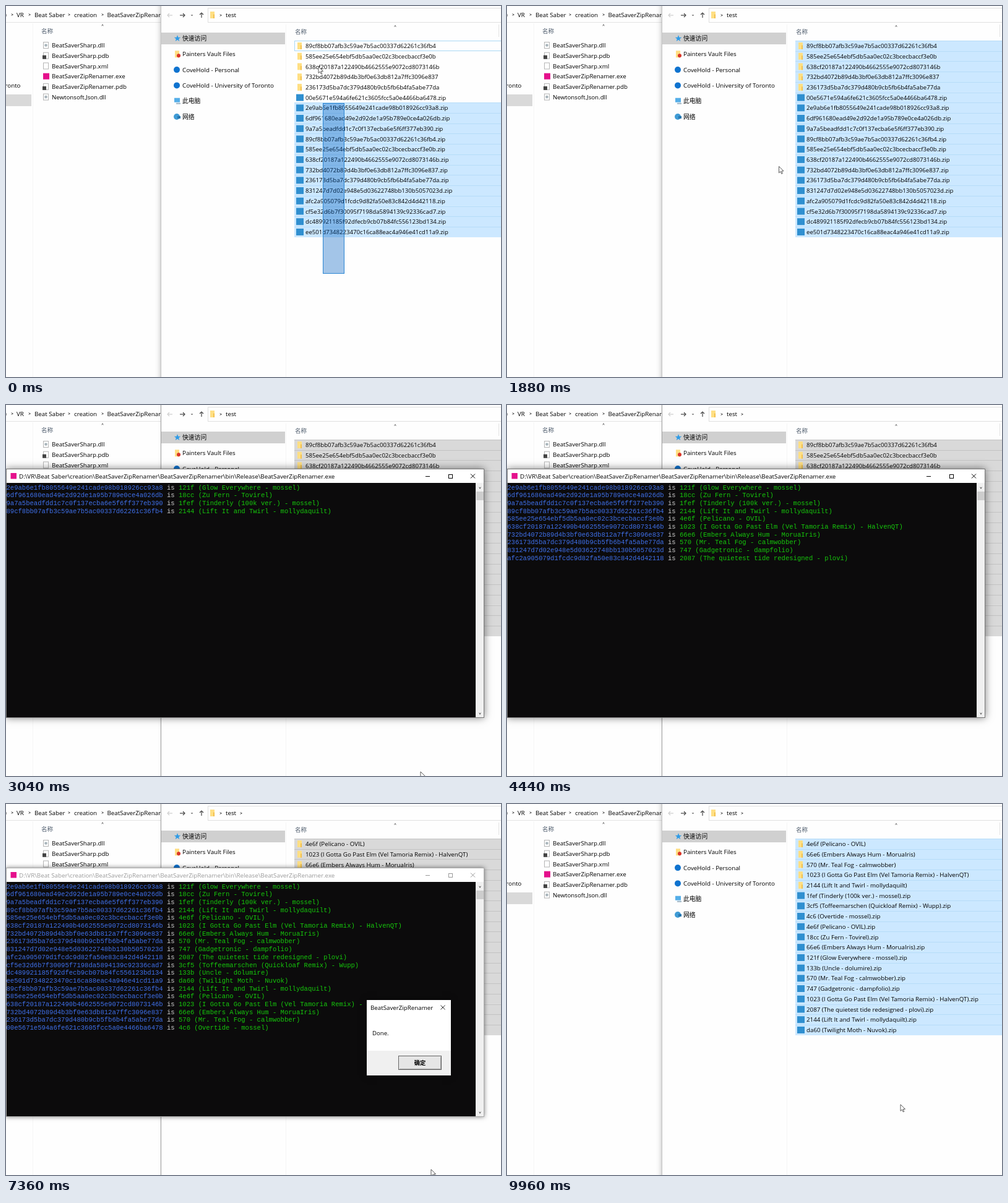
An HTML page with a canvas that plays this animation: 800x600 px, repeating every 10 s.

```html
<!DOCTYPE html>
<html lang="zh">
<head>
<meta charset="utf-8">
<style>
html, body { margin: 0; width: 100%; height: 100%; overflow: hidden; background: #fefefe; }
canvas { display: block; }
</style>
</head>
<body>
<canvas id="stage" width="800" height="600"></canvas>
<script>
const ctx = document.getElementById('stage').getContext('2d');
const LOOP = 10000, ROW = 16.72;
const UI = '"Open Sans", "Noto Sans CJK SC", "Noto Sans CJK", sans-serif';
const MONO = '10.55px "Liberation Mono", monospace';
const TITLE = 'D:\\VR\\Beat Saber\\creation\\BeatSaverZipRenamer\\BeatSaverZipRenamer\\bin\\Release\\BeatSaverZipRenamer.exe';

// Archives in list order: hash, short id, title and author
const songs = [
  ['00e5671e594a6fe621c3605fcc5a0e4466ba6478', '4c6', 'Overtide - mossel'],
  ['2e9ab6e1fb8055649e241cade98b018926cc93a8', '121f', 'Glow Everywhere - mossel'],
  ['6df961680ead49e2d92de1a95b789e0ce4a026db', '18cc', 'Zu Fern - Tovirel'],
  ['9a7a5beadfdd1c7c0f137ecba6e5f6ff377eb390', '1fef', 'Tinderly (100k ver.) - mossel'],
  ['89cf8bb07afb3c59ae7b5ac00337d62261c36fb4', '2144', 'Lift It and Twirl - mollydaquilt'],
  ['585ee25e654ebf5db5aa0ec02c3bcecbaccf3e0b', '4e6f', 'Pelicano - OVIL'],
  ['638cf20187a122490b4662555e9072cd8073146b', '1023', 'I Gotta Go Past Elm (Vel Tamoria Remix) - HalvenQT'],
  ['732bd4072b89d4b3bf0e63db812a7ffc3096e837', '66e6', 'Embers Always Hum - MoruaIris'],
  ['236173d5ba7dc379d480b9cb5fb6b4fa5abe77da', '570', 'Mr. Teal Fog - calmwobber'],
  ['831247d7d02e948e5d03622748bb130b5057023d', '747', 'Gadgetronic - dampfolio'],
  ['afc2a905079d1fcdc9d82fa50e83c842d4d42118', '2087', 'The quietest tide redesigned - plovi'],
  ['cf5e32d6b7f30095f7198da5894139c92336cad7', '3cf5', 'Toffeemarschen (Quickloaf Remix) - Wupp'],
  ['dc489921185f92dfecb9cb07b84fc556123bd134', '133b', 'Uncle - dolumire'],
  ['ee501d7348223470c16ca88eac4a946e41cd11a9', 'da60', 'Twilight Moth - Nuvok']
].map(([hash, id, title]) => ({ hash, id, name: `${id} (${title})` }));
const folders = songs.slice(4, 9);
const output = [...songs.slice(1), ...folders, songs[0]];
const outputTimes = [2500, 2680, 2840, 2990, 3200, 3450, 3700, 3900, 4100, 4300,
  4550, 4800, 5050, 5300, 5600, 5900, 6150, 6400, 6800];

const OPEN = 1945, DIALOG = 7100, CONFIRM = 8240, CLOSE = 8440, RESORT = 9500;

// Pointer path: time, x, y
const path = [
  [0, 505, 98], [240, 500, 60], [420, 502, 66], [620, 470, 92], [880, 246, 122],
  [1040, 70, 112], [1300, 72, 114], [2040, 489, 279], [3040, 670, 593], [3110, 672, 606],
  [7290, 686, 606], [7360, 687, 591], [7900, 672, 424], [8300, 668, 420],
  [9000, 655, 560], [9480, 650, 575], [9850, 636, 486], [10000, 636, 486]
];

const clamp = v => Math.max(0, Math.min(1, v));
const mix = (a, b, p) => a + (b - a) * p;
const easeOut = p => 1 - (1 - clamp(p)) ** 2;
const smooth = p => p * p * (3 - 2 * p);

function rect(x, y, w, h, color) {
  ctx.fillStyle = color;
  ctx.fillRect(x, y, w, h);
}
function text(s, x, y, color = '#000', size = 9.75, weight = '') {
  ctx.font = `${weight} ${size}px ${UI}`;
  ctx.fillStyle = color;
  ctx.fillText(s, x, y);
}
function line(points, color = '#555', width = 1) {
  ctx.beginPath();
  points.forEach(([x, y]) => ctx.lineTo(x, y));
  ctx.strokeStyle = color;
  ctx.lineWidth = width;
  ctx.stroke();
}
function frame(x, y, w, h, color) {
  ctx.strokeStyle = color;
  ctx.lineWidth = 1;
  ctx.strokeRect(x + .5, y + .5, w - 1, h - 1);
}
function dot(x, y, r, color) {
  ctx.beginPath();
  ctx.arc(x, y, r, 0, 7);
  ctx.fillStyle = color;
  ctx.fill();
}
// Shadow around a box only, so that a translucent window is not darkened
function outerShadow(x, y, w, h, blur, alpha) {
  ctx.save();
  ctx.beginPath();
  ctx.rect(-100, -100, 1000, 800);
  ctx.rect(x, y, w, h);
  ctx.clip('evenodd');
  ctx.shadowColor = `rgba(0,0,0,${alpha})`;
  ctx.shadowBlur = blur;
  rect(x, y, w, h, '#000');
  ctx.restore();
}
function chevron(x, y, dx, dy, color = '#555') {
  line([[x - dx - dy, y - dy - dx], [x + dx, y + dy], [x - dx + dy, y - dy + dx]], color);
}
function arrow(x, y, dx, dy, color) {
  line([[x - 4 * dx, y - 4 * dy], [x + 4 * dx, y + 4 * dy]], color, 1.2);
  const tx = x + 4 * dx, ty = y + 4 * dy, s = 3;
  line([[tx - s * dx - s * dy, ty - s * dy - s * dx], [tx, ty],
        [tx - s * dx + s * dy, ty - s * dy + s * dx]], color, 1.2);
}
function cross(x, y, r, color) {
  line([[x - r, y - r], [x + r, y + r]], color);
  line([[x - r, y + r], [x + r, y - r]], color);
}
function folderIcon(x, y) {
  rect(x, y - 5.5, 7, 11, '#ffdf83');
  rect(x + 5, y - 1, 2, 6.5, '#f3c14e');
}
function docIcon(x, y, mark) {
  rect(x, y - 5.5, 9, 11, '#fff');
  frame(x, y - 5.5, 9, 11, '#b5b5b5');
  if (mark === 'dll') dot(x + 4.5, y, 2.3, '#a8b4bb');
  if (mark === 'pdb') rect(x - 1, y - .5, 6, 6, '#444');
}

function drawLeftWindow() {
  text(')', -2, 17.5);
  [[10, 'VR', 17], [38, 'Beat Saber', 46], [102, 'creation', 110], [156, 'BeatSaverZipRenamer', 163.5]]
    .forEach(([cx, label, x]) => {
      chevron(cx, 14, 1.4, 0);
      text(label, x, 17.5);
    });
  rect(0, 26, 250, 1, '#e4e4e4');
  rect(43, 28, 1, 572, '#f6f6f6');
  ctx.textAlign = 'right';
  text('University of Toronto', 23.5, 131.5);
  ctx.textAlign = 'left';
  rect(0, 143, 41, 19, '#d9d9d9');
  text('名称', 57, 43.5, '#4c5a6b', 9.6);
  chevron(156, 31, 0, -1.3, '#777');
  ['BeatSaverSharp.dll', 'BeatSaverSharp.pdb', 'BeatSaverSharp.xml',
   'BeatSaverZipRenamer.exe', 'BeatSaverZipRenamer.pdb', 'Newtonsoft.Json.dll'].forEach((name, i) => {
    const y = 63.5 + i * ROW, type = name.slice(-3);
    if (type === 'exe') rect(60, y - 5, 10, 10, '#e5108c');
    else docIcon(60, y, type);
    text(name, 74, y + 3.6, '#000', 9.7);
  });
}

function drawSidebar() {
  rect(251, 43, 200, 19, '#d0d0d0');
  rect(452, 30, 1, 570, '#f5f5f5');
  const y = i => 52.5 + i * 25.3;
  ['快速访问', 'Painters Vault Files', 'CoveHold - Personal',
   'CoveHold - University of Toronto', '此电脑', '网络']
    .forEach((label, i) => text(label, 285, y(i) + 3.5, '#000', 9.8));

  ctx.beginPath();
  for (let k = 0; k < 10; k++) {
    const r = k % 2 ? 2.3 : 5.5, a = k * Math.PI / 5 - Math.PI / 2;
    ctx.lineTo(277 + r * Math.cos(a), y(0) + r * Math.sin(a));
  }
  ctx.fillStyle = '#2e9be6';
  ctx.fill();
  folderIcon(273, y(1));
  dot(279, y(1) + 2.5, 3, '#d9362b');
  dot(276, y(2), 5, '#0f73cf');
  dot(276, y(3), 5, '#0f73cf');
  rect(272, y(4) - 5, 9, 7, '#55aee8');
  rect(275, y(4) + 3, 7, 2, '#9bb3c4');
  dot(276, y(5), 5, '#3f9bd5');
  rect(277, y(5) - 1, 5, 4, '#2876ae');
}

function listNames(t) {
  const done = k => t >= outputTimes[k] + 70;
  const byNumber = (a, b) => (parseInt(a.id) || 1e9) - (parseInt(b.id) || 1e9);
  const dirs = folders.slice(), zips = songs.slice();
  if (done(13)) dirs.push(dirs.shift());
  if (t >= RESORT) { dirs.sort(byNumber); zips.sort(byNumber); }
  return [
    ...dirs.map(s => done(13 + folders.indexOf(s)) ? s.name : s.hash),
    ...zips.map(s => (done(s === songs[0] ? 18 : songs.indexOf(s) - 1) ? s.name : s.hash) + '.zip')
  ];
}

function drawRightWindow(t) {
  const active = t < OPEN || t >= CLOSE + 100;
  outerShadow(251, -10, 560, 620, active ? 9 : 5, active ? .35 : .2);
  rect(251, 0, 549, 600, '#fefefe');
  rect(250, 0, 1, 600, active ? '#c4c4c4' : '#a0a0a0');
  arrow(265, 15, -1, 0, '#cfcfcf');
  arrow(285, 15, 1, 0, '#444');
  chevron(300.5, 15, 0, 1);
  arrow(316, 15, 0, -1, '#444');
  frame(326, 3, 490, 24, '#e0e0e0');
  folderIcon(330, 14.5);
  chevron(347, 15, 1.4, 0);
  text('test', 355, 18);
  if (t > 3160) chevron(380, 15, 1.4, 0);
  drawSidebar();

  text('名称', 467, 44.5, '#4c5a6b', 9.6);
  chevron(629, 32.5, 0, -1.3, '#777');
  rect(796, 30, 1, 20, '#e3e3e3');

  const drag = easeOut((t - 40) / 200), top = mix(157, 60, drag), left = mix(512, 503, drag);
  listNames(t).forEach((name, i) => {
    const y = 56 + i * ROW;
    if (y + ROW > top) {
      rect(466, y, 334, ROW + .3, active ? '#cce8ff' : '#d9d9d9');
      rect(466, Math.round(y), 334, 1, active ? '#b6dcf8' : '#c3c3c3');
    } else if (!i) frame(466, 56, 340, 17, '#a9d8f5');
    if (i < 5) folderIcon(471, y + 8.5);
    else rect(469, y + 3, 12, 11, '#2f8fd0');
    text(name, 484, y + 12.1, '#000', /^[0-9a-f]{40}/.test(name) ? 9.6 : 9.75);
  });
  if (t < 400) {
    rect(left, top, 547 - left, 432 - top, 'rgba(0,95,190,.36)');
    frame(Math.round(left), Math.round(top), 547 - Math.round(left), 433 - Math.round(top), '#2b86d3');
  }
}

function drawConsole(t) {
  const p = t < CLOSE ? easeOut((t - OPEN) / 200) : 1 - easeOut((t - CLOSE) / 180);
  if (p <= 0) return;
  const focused = t < DIALOG || t >= CONFIRM, scale = .95 + .05 * p;
  const ink = focused ? '#000' : '#999';
  ctx.save();
  ctx.globalAlpha = p;
  ctx.translate(386.5, 304.5);
  ctx.scale(scale, scale);
  ctx.translate(-386.5, -304.5);
  outerShadow(0, 103, 773, 403, focused ? 12 : 7, .5);
  rect(0, 126, 759, 380, '#0c0b0c');
  rect(0, 103, 773, 23, '#fff');
  rect(759, 126, 14, 380, '#f0f0f0');
  rect(760, 140, 12, 14, '#cdcdcd');
  chevron(766, 134, 0, 1.3);
  chevron(766, 499, 0, 1.3);
  frame(0, 103, 773, 403, focused ? '#777' : '#aaa');
  rect(7.5, 110, 9.5, 9.5, '#e5108c');
  text(TITLE, 21, 118.5, ink, 9.8);
  line([[678, 115.5], [685, 115.5]], ink);
  frame(715, 112, 7, 7, ink);
  cross(754.5, 115, 3.5, ink);

  ctx.font = MONO;
  const cell = 6.33, shown = outputTimes.filter(at => t >= at).length;
  output.slice(0, shown).forEach((song, i) => {
    const y = 136.8 + i * 12.67;
    ctx.fillStyle = '#3f70ea';
    ctx.fillText(song.hash, .5, y);
    ctx.fillStyle = '#ccc';
    ctx.fillText('is', .5 + 41 * cell, y);
    ctx.fillStyle = '#16c60c';
    ctx.fillText(song.name, .5 + 44 * cell, y);
  });
  if (!shown) rect(1, 136, 6, 2.5, '#eee');
  ctx.restore();
}

function drawDialog(t) {
  if (t < DIALOG || t >= CONFIRM) return;
  ctx.save();
  ctx.globalAlpha = clamp((t - DIALOG) / 120);
  outerShadow(583, 317, 136, 122, 10, .5);
  rect(583, 317, 136, 82, '#fff');
  rect(583, 399, 136, 40, '#f0f0f0');
  text('BeatSaverZipRenamer', 589, 332.5);
  cross(706, 329, 3.5, '#333');
  text('Done.', 592, 373.5, '#000', 9.6);
  rect(634, 407, 70, 23, '#e6e6e6');
  frame(634, 407, 70, 23, '#666');
  line([[636, 428.5], [702.5, 428.5], [702.5, 409]], '#a0a0a0');
  ctx.textAlign = 'center';
  text('确定', 669, 421.8, '#000', 9.3, 'bold');
  ctx.restore();
}

function drawPointer(t) {
  const i = path.findIndex(k => k[0] > t), [t0, x0, y0] = path[i - 1], [t1, x1, y1] = path[i];
  const p = smooth((t - t0) / (t1 - t0));
  ctx.save();
  ctx.translate(mix(x0, x1, p), mix(y0, y1, p));
  ctx.beginPath();
  [[0, 0], [0, 10.5], [2.5, 8.2], [4.2, 12], [5.8, 11.3], [4.2, 7.6], [7.5, 7.4]]
    .forEach(([x, y]) => ctx.lineTo(x, y));
  ctx.closePath();
  ctx.fillStyle = '#fff';
  ctx.fill();
  ctx.strokeStyle = '#333';
  ctx.lineWidth = .8;
  ctx.stroke();
  ctx.restore();
}

function draw(now) {
  const t = now % LOOP;
  rect(0, 0, 800, 600, '#fefefe');
  drawLeftWindow();
  drawRightWindow(t);
  drawConsole(t);
  drawDialog(t);
  drawPointer(t);
  requestAnimationFrame(draw);
}
requestAnimationFrame(draw);
</script>
</body>
</html>
```
